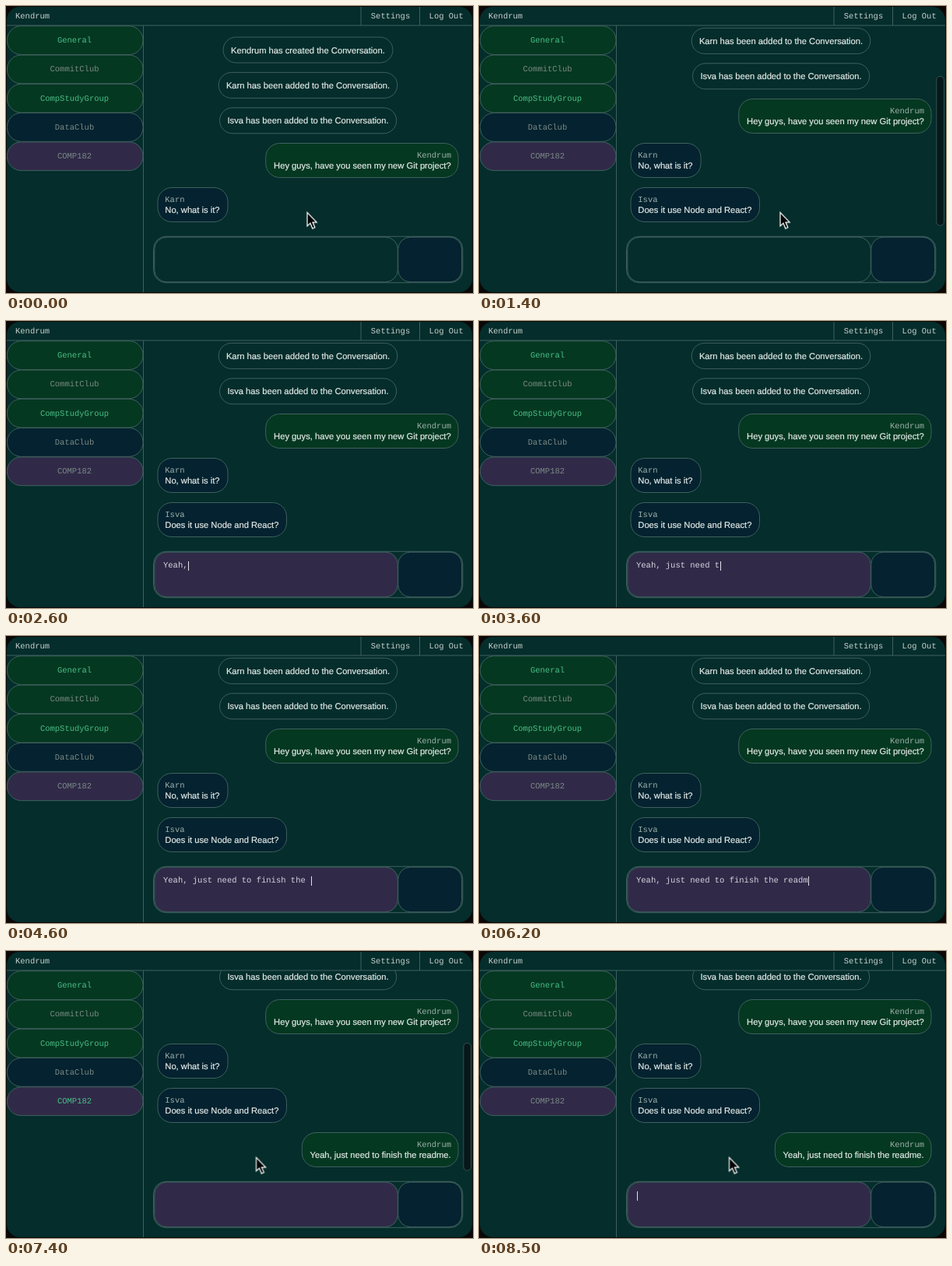
Recreate the animation shown at these times as an HTML page. Size 600 by 369 pixels, loop 8800 ms.

```html
<!DOCTYPE html>
<html lang="en">
<head>
<meta charset="utf-8">
<title>Group chat</title>
<style>
  :root {
    --loop: 8800ms;
    --bg: #042d2b;
    --line: #40615f;
    --green: #053820;
    --navy: #04222f;
    --purple: #302a48;
    --mint: #49bd88;
    --mute: #7b8985;
  }
  html, body {
    margin: 0;
    width: 100%;
    height: 100%;
    overflow: hidden;
    background: #0c0807;
  }
  svg { position: absolute; left: 0; top: 0; }
  text, .typed { text-rendering: geometricPrecision; white-space: pre; }
  .mono, .typed { font: 10.5px "Liberation Mono", "Courier New", monospace; }
  .sans {
    font: 11.2px "Liberation Sans", Arial, sans-serif;
    fill: #e4ebe9;
    stroke: #e4ebe9;
    stroke-width: .2;
  }
  .mid { text-anchor: middle; }
  .end { text-anchor: end; }
  .head { fill: #c6d1ce; }
  .name { fill: #9cb0ab; }
  .mute { fill: var(--mute); }
  .mint { fill: var(--mint); }

  .box { stroke: var(--line); fill: none; }
  .green { fill: var(--green); }
  .navy { fill: var(--navy); }
  .purple { fill: var(--purple); }

  .scroll, .thumb, .field, .unread, .pointer, .typed, .caret {
    animation: var(--loop) step-end infinite;
  }

  /* chat jumps up one message at a time */
  .scroll { animation-name: scroll; }
  @keyframes scroll {
    0% { transform: translateY(0); }
    15.909% { transform: translateY(-57px); }
    84.09%, 100% { transform: translateY(-114px); }
  }

  /* overlay scrollbar shows on scroll, then fades */
  .thumb { fill: #07181a; stroke: #38514f; opacity: 0; }
  .thumb.one { animation-name: thumb-one; }
  .thumb.two { animation-name: thumb-two; }
  @keyframes thumb-one {
    0% { opacity: 0; }
    15.909% { opacity: 1; }
    21.59% { opacity: 1; animation-timing-function: linear; }
    24.432%, 100% { opacity: 0; }
  }
  @keyframes thumb-two {
    0% { opacity: 0; }
    84.09% { opacity: 1; }
    89.77% { opacity: 1; animation-timing-function: linear; }
    92.614%, 100% { opacity: 0; }
  }

  .field { animation-name: focus; }
  @keyframes focus {
    0% { fill: var(--bg); }
    22.727%, 100% { fill: var(--purple); }
  }

  .unread { animation-name: unread; }
  @keyframes unread {
    0% { fill: var(--mute); }
    84.09% { fill: var(--mint); }
    87.5%, 100% { fill: var(--mute); }
  }

  .pointer { animation-name: pointer; }
  @keyframes pointer {
    0% { transform: translate(387px, 265.5px); opacity: 1; }
    19.318% {
      transform: translate(387px, 265.5px);
      opacity: 1;
      animation-timing-function: ease-in;
    }
    22.726% { transform: translate(352px, 290px); opacity: 1; }
    22.727% { transform: translate(321.5px, 265.5px); opacity: 0; }
    84.09%, 100% { transform: translate(321.5px, 265.5px); opacity: 1; }
  }

  .typed {
    position: absolute;
    left: 202px;
    top: 308px;
    height: 14px;
    line-height: 14px;
    color: #d6d4df;
    animation-name: typing;
  }
  .typed span { display: block; overflow: hidden; }
  @keyframes typing {
    0% { width: 0; }
    26.136% { width: 2ch; }
    27.27% { width: 4ch; }
    29.54% { width: 5ch; animation-timing-function: steps(25); }
    52.27% { width: 30ch; }
    53.409% { width: 32ch; }
    55.68% { width: 33ch; }
    57.95% { width: 35ch; }
    75% { width: 36ch; }
    77.27% { width: 37ch; }
    84.09%, 100% { width: 0; }
  }

  .caret {
    position: absolute;
    left: calc(100% + .5px);
    top: 1px;
    width: 1.1px;
    height: 12px;
    background: #e2e0ea;
    animation-name: blink;
  }
  @keyframes blink {
    0% { opacity: 0; }
    22.727% { opacity: 1; }
    63.636% { opacity: 0; }
    69.318% { opacity: 1; }
    82.95% { opacity: 0; }
    85.227% { opacity: 1; }
    90.909% { opacity: 0; }
    96.59%, 100% { opacity: 1; }
  }
</style>
</head>
<body>
<svg width="600" height="369" viewBox="0 0 600 369">
  <defs>
    <clipPath id="window"><rect x="1" y="1" width="598" height="367" rx="17"/></clipPath>
    <clipPath id="chat"><rect x="177" y="25.5" width="422" height="264"/></clipPath>
  </defs>

  <g clip-path="url(#window)">
    <rect width="600" height="369" fill="#042d2b"/>
    <path class="box" d="M0 25H600M176.5 25V369M456 0V25M531.5 0V25"/>
  </g>

  <g class="mono head">
    <text x="12" y="15.7">Kendrum</text>
    <text x="468.8" y="15.7">Settings</text>
    <text x="543.6" y="15.7">Log Out</text>
  </g>

  <g class="box">
    <rect class="green" x="1.5" y="25.7" width="174.5" height="36.8" rx="18"/>
    <rect class="green" x="1.5" y="63" width="174.5" height="36.8" rx="18"/>
    <rect class="green" x="1.5" y="100.3" width="174.5" height="36.8" rx="18"/>
    <rect class="navy" x="1.5" y="137.5" width="174.5" height="36.8" rx="18"/>
    <rect class="purple" x="1.5" y="174.8" width="174.5" height="36.8" rx="18"/>
  </g>
  <g class="mono mid">
    <text class="mint" x="88" y="47.2">General</text>
    <text class="mute" x="88" y="84.4">CommitClub</text>
    <text class="mint" x="88" y="121.7">CompStudyGroup</text>
    <text class="mute" x="88" y="158.9">DataClub</text>
    <text class="unread" x="88" y="196.1">COMP182</text>
  </g>

  <g clip-path="url(#chat)">
    <g class="scroll">
      <g class="box">
        <rect x="279" y="40" width="218" height="33" rx="16.5"/>
        <rect x="273.2" y="85.4" width="229.6" height="33" rx="16.5"/>
        <rect x="274.5" y="130.8" width="227.2" height="33" rx="16.5"/>
        <rect class="green" x="333.7" y="176.5" width="247.3" height="44" rx="18"/>
        <rect class="navy" x="195" y="233.5" width="90" height="44" rx="18"/>
        <rect class="navy" x="195" y="290.5" width="165.5" height="44" rx="18"/>
        <rect class="green" x="380.3" y="347.5" width="200.7" height="44" rx="18"/>
      </g>
      <g class="sans mid">
        <text x="388" y="60.6">Kendrum has created the Conversation.</text>
        <text x="388" y="106">Karn has been added to the Conversation.</text>
        <text x="388" y="151.2">Isva has been added to the Conversation.</text>
      </g>
      <g class="mono name">
        <text class="end" x="572" y="194.5">Kendrum</text>
        <text x="204.3" y="251.5">Karn</text>
        <text x="204.3" y="308.5">Isva</text>
        <text class="end" x="572" y="365.5">Kendrum</text>
      </g>
      <g class="sans">
        <text class="end" x="571.7" y="208.6">Hey guys, have you seen my new Git project?</text>
        <text x="204.3" y="265.6">No, what is it?</text>
        <text x="204.3" y="322.6">Does it use Node and React?</text>
        <text class="end" x="571.7" y="379.6">Yeah, just need to finish the readme.</text>
      </g>
    </g>
  </g>
  <rect class="thumb one" x="587.8" y="90.3" width="9.6" height="192" rx="4.8"/>
  <rect class="thumb two" x="587.8" y="118.3" width="9.6" height="164" rx="4.8"/>

  <g class="box">
    <rect x="189.5" y="296.3" width="397.3" height="59.4" rx="16"/>
    <rect class="field" x="190.8" y="297.2" width="312.5" height="57.6" rx="15.5"/>
    <rect class="navy" x="503.8" y="297.2" width="81.8" height="57.6" rx="15.5"/>
  </g>

  <path class="pointer" d="M0 0V17.3L4 13.7L6.8 20.6L9.9 19.3L7 12.6H12.2Z"
        fill="#000" stroke="#fff" stroke-width="1.2"/>
</svg>
<div class="typed"><span>Yeah, just need to finish the readme.</span><i class="caret"></i></div>
</body>
</html>
```
